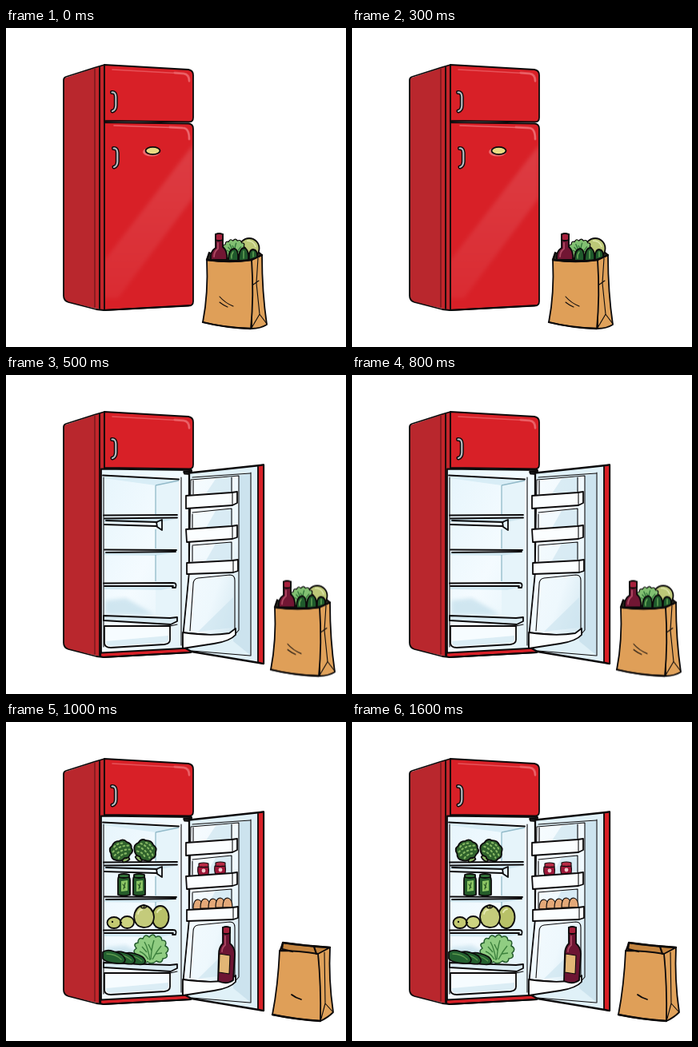
An HTML page for the animation above (2000 ms loop, 425 px wide and 399 px high).

```html
<!DOCTYPE html>
<html lang="en">
<head>
<meta charset="utf-8">
<title>Filling the fridge</title>
<style>
  html, body { margin: 0; width: 100%; height: 100%; overflow: hidden; background: #fff; }
  svg { display: block; width: 100vw; height: 100vh; }
  .ink { stroke: #0c0a0b; stroke-width: 1.8; stroke-linecap: round; stroke-linejoin: round; }
  .line { fill: none; }
  .thin { stroke-width: 1.1; }
  .bold { stroke-width: 2.3; }
  .shade { stroke: none; }
  .gloss { fill: none; stroke: #f0747a; stroke-width: 1.6; stroke-linecap: round; }

  .closed, .open, .stocked, .shopping { animation: 2s step-end infinite; }
  .closed { animation-name: closed; }
  .open { animation-name: open; }
  .stocked { animation-name: stocked; }
  .shopping { animation-name: shopping; }
  @keyframes closed { 0% { opacity: 1 } 25%, 100% { opacity: 0 } }
  @keyframes open { 0% { opacity: 0 } 25%, 100% { opacity: 1 } }
  @keyframes stocked { 0% { opacity: 0 } 50%, 100% { opacity: 1 } }
  @keyframes shopping {
    0% { opacity: 1; transform: translate(0, 0) }
    25% { opacity: 1; transform: translate(85px, .5px) }
    50%, 100% { opacity: 0; transform: translate(85px, .5px) }
  }
</style>
</head>
<body>
<svg viewBox="0 0 425 399" preserveAspectRatio="none">
  <defs>
    <linearGradient id="wall" x1="0" y1="0" x2="1" y2="1">
      <stop offset="0" stop-color="#e6f5fc"/><stop offset=".5" stop-color="#f4fbff"/><stop offset="1" stop-color="#e0f1f8"/>
    </linearGradient>
    <linearGradient id="inner" x1="0" y1="0" x2="1" y2="1">
      <stop offset="0" stop-color="#f7fcff"/><stop offset=".65" stop-color="#eef8fd"/><stop offset="1" stop-color="#cfe5ef"/>
    </linearGradient>
    <linearGradient id="sheen" x1="0" y1="0" x2="0" y2="1">
      <stop offset="0" stop-color="#fff" stop-opacity=".13"/><stop offset="1" stop-color="#fff" stop-opacity=".05"/>
    </linearGradient>
    <filter id="soft"><feGaussianBlur stdDeviation="2.5"/></filter>
    <clipPath id="door"><path d="M124 119 L233 121 V346 L124 351Z"/></clipPath>
    <g id="handle" fill="none" stroke-linecap="round" stroke-linejoin="round">
      <path id="grip" stroke="#0c0a0b" stroke-width="5" d="M132.500 80.500 Q137 80 137.300 86 V97 Q137 103 133 104"/>
      <path stroke="#b4bbc0" stroke-width="2.200" d="M132.500 80.500 Q137 80 137.300 86 V97 Q137 103 133 104"/>
    </g>
    <g id="broccoli" class="ink">
      <path fill="#8fb567" d="M-4 5 L-4 14 Q0 16 5 14 L5 5Z"/>
      <path fill="#2f622c" d="M-11 8 Q-16 4 -13 -2 Q-14 -9 -8 -10 Q-3 -15 3 -12 Q9 -13 11 -7 Q16 -3 13 2 Q14 8 8 9 Q4 13 0 10 Q-6 13 -11 8Z"/>
      <path class="line" style="stroke:#86b763;stroke-width:2.2;stroke-dasharray:1.5 3.5" d="M-6 -8 Q0 -11 7 -7 M-10 -3 Q0 -7 11 -2 M-10 2 Q0 -2 10 3 M-7 7 Q0 3 7 7"/>
    </g>
    <g id="jar" class="ink">
      <path fill="#255c2a" d="M2 3 Q1 5 1 8 V26 Q8 29 16 26 V8 Q16 5 14 3Z"/>
      <path fill="#34753a" d="M2 1 Q8 -1 15 1 V4 Q8 6 2 4Z"/>
      <path class="shade" fill="#8cc664" d="M5 9 L13 8 V21 L5 22Z"/>
      <path class="line thin" style="stroke:#245021" d="M7 13 L10 17 M10 11 L8 19"/>
    </g>
    <g id="jam" class="ink thin">
      <path fill="#9c1738" d="M0 5 Q-1 12 1 15 Q7 17 13 15 Q14 9 13 5Z"/>
      <path fill="#b72a45" d="M1 1 Q7 -1 13 1 V5 Q7 6 1 5Z"/>
      <circle class="shade" fill="#f1c6c9" cx="7" cy="10" r="2.4"/>
    </g>
    <path id="egg" class="ink thin" fill="#e3a878" d="M-6 7 Q-6 -5 0 -5 Q6 -4 6 7Z"/>
    <g id="cucumber" class="ink">
      <path fill="#236030" d="M-14 -6 Q-10 -10 0 -7 Q12 -4 14 3 Q14 9 5 8 Q-10 7 -14 2Z"/>
      <path class="line" style="stroke:#5d9b4e;stroke-width:1.5" d="M-9 -4 Q2 -4 9 3"/>
    </g>
    <path id="leaves" d="M-17 16 Q-22 11 -18 7 Q-24 3 -18 -1 Q-23 -7 -16 -8 Q-16 -15 -10 -13 Q-7 -20 -2 -15 Q3 -21 6 -15 Q13 -18 14 -11 Q21 -11 18 -4 Q25 0 19 5 Q23 11 15 12 Q14 19 7 15 Q1 20 -4 16 Q-11 20 -17 16Z"/>
    <path id="veins" d="M-1 14 Q-3 0 -8 -9 M0 13 Q1 -2 4 -11 M2 13 Q7 3 13 -4 M-3 13 Q-8 5 -14 3 M-5 4 L-11 -3 M1 2 L-3 -6 M6 6 L14 5"/>
  </defs>

  <!-- cabinet and freezer -->
  <path fill="#b9272d" d="M72 63 L111 50 L123 46 V353 L113 351 L78 343 Q72 341 72 335Z"/>
  <path fill="#d82128" d="M111 50 L124 46 V352 L111 350Z" opacity=".3"/>
  <path class="ink" fill="#d82027" d="M123 46 L228 52 Q234 53 234 59 V112 Q234 117.500 229 117.500 L123 116Z"/>
  <path class="gloss" d="M133 52 L222 57 Q229 58 229 67" opacity=".6"/>
  <path class="gloss" style="stroke-width:3;opacity:.55" d="M211 56 L222 57 Q229 58 229 66"/>
  <use href="#handle"/>

  <g class="closed">
    <path class="ink" fill="#d82027" d="M123 118 L228 119.500 Q234 120 234 126 V342 Q234 347.500 228 347.500 L123 353Z"/>
    <g clip-path="url(#door)">
      <path fill="url(#sheen)" filter="url(#soft)" d="M234 146 V212 L140 338 H122 V292Z"/>
    </g>
    <path class="gloss" d="M135 122 L221 125 Q229 125 229 139" opacity=".8"/>
    <path class="gloss" style="stroke-width:3;opacity:.55" d="M205 124 L221 125 Q229 125 229 139"/>
    <use href="#handle" x="2" y="70"/>
    <ellipse cx="182" cy="155" rx="11" ry="5.5" fill="#ef6a6e"/>
    <ellipse class="ink" cx="183.500" cy="153.500" rx="9" ry="4.700" fill="#eadb83"/>
  </g>

  <g class="open">
    <!-- compartment -->
    <path class="ink" fill="#d82027" d="M119 340 L231 338 V347 L122 353 L118 352Z"/>
    <path class="ink" fill="url(#wall)" d="M119 117.500 L232 119 L230 341.500 L119 347.500Z"/>
    <path fill="#d8edf6" d="M122 129 L187 138 L216 132 L122 127Z"/>
    <path fill="#e6f4fa" d="M187 138 L216 132 V303 L187 300Z"/>
    <path fill="#c5e1ed" d="M123 180 H213 L188 185 L123 184Z M123 222 H212 L187 226 L123 225Z M123 265 H211 L194 269 L123 268Z" opacity=".7"/>
    <path fill="#b9d9e7" filter="url(#soft)" d="M124 282 L150 279 L186 300 H124Z" opacity=".6"/>
    <path class="line" stroke="#92bac9" stroke-width="1.3" d="M187 138 V174 M187 193 V217 M187 225 V258 M187 138 L216 132"/>
    <path class="ink line" d="M121 125.500 L216 130.500"/>
    <path class="ink line thin" d="M219 128 V338 M122 128 V340"/>
    <path class="ink" fill="#27282b" d="M222 121 L231 121 V124 L223 123.500Z"/>
    <path class="ink line" d="M122 175.500 L214 175 M123 179.500 L214 178.500 M123 187 L188 189 M125 182 L189 184 M188 184 L195 181 V194 L189 190Z M123 218.500 L213 219 M125 222 L212 221 M122 260.500 L209 260 M123 264 L209 264 M209 260 Q214 260 212 266 L208 266"/>
    <path class="ink" fill="#d9ebf3" d="M122 301 L205 304 L214 303 V308 L206 312 L122 307Z"/>
    <path class="ink" fill="#f6fcff" d="M123 314 L205 314 V331 Q205 336 198 337 L131 341 Q123 341 123 335Z"/>
    <path class="shade" fill="#d0e7f1" d="M125 333 L203 326 V331 Q203 335 197 335 L131 339 Q125 339 125 334Z" opacity=".7"/>
    <path class="ink line thin" d="M205 314 L214 312"/>

    <!-- open door -->
    <path class="ink bold" fill="#e0f1f8" d="M229 122.500 L322 112.500 V361 L232 346 L221 340 L222 321 L229 249Z"/>
    <path fill="#cce3ee" d="M291 126 L305 123 V350 L284 333Z"/>
    <path fill="#deeff7" d="M307 122 L314 115 V358 L307 351Z"/>
    <path class="ink" fill="#d82027" d="M315 113.500 L322 112.500 V361 L315 359.500Z"/>
    <path class="ink thin" fill="url(#inner)" d="M231 131 L291 126 V319 L284 327 L222 322 L229 250Z"/>
    <path class="ink line thin" d="M306 122 V351 M233 128 L305 123 M232 345 L305 351"/>
    <path fill="#cae3ee" d="M262 130 L283 127 V147 L250 148Z M262 170 L283 167 V189 L250 191Z M262 211 L283 209 V231 L250 232Z M284 278 V316 L240 321Z" opacity=".6"/>
    <path class="ink line thin" d="M234 132 V149 M282 128 V146 M233 172 L282 167 V188 M233 174 V191 M233 213 L282 209 V231 M233 214 V233 M230 320 L234 262 Q234 255 240 254 L280 250 Q286 250 286 257 V317"/>
    <g class="stocked">
      <use href="#jam" x="240" y="176"/><use href="#jam" x="261" y="175"/>
      <use href="#egg" x="240" y="227"/><use href="#egg" x="249" y="226"/><use href="#egg" x="259" y="226"/><use href="#egg" x="268" y="225"/><use href="#egg" x="277" y="225"/>
    </g>
    <g class="ink" fill="#fbfeff">
      <path d="M225 151 L282 147 L289 146 V160 L283 163 L225 167Z"/>
      <path d="M225 193 L282 189 L289 188 V203 L283 205 L226 209Z"/>
      <path d="M226 235 L283 232 L290 231 V245 L284 247 L226 249Z"/>
      <path d="M221 322 Q255 327 279 323 L287 317 V325 Q280 333 260 336 L221 342Z"/>
    </g>
    <path class="ink line thin" d="M283 147 V162 M283 189 V204 M284 232 V246"/>
  </g>

  <!-- cabinet outline -->
  <path class="ink line" d="M123 46 L111 49.500 L75 61 Q72 62 72 65 V335 Q72 341 78 343 L113 352 L122 353 L231 347"/>
  <path class="line" stroke="#65151a" stroke-width="1.200" d="M111 51 V350"/>
  <path class="ink line" d="M117 49 V351 M123 47 V117"/>

  <g class="stocked">
    <use href="#broccoli" transform="translate(174 161) rotate(42)"/>
    <use href="#broccoli" transform="translate(144 161) rotate(-25)"/>
    <use href="#jar" x="139" y="190"/><use href="#jar" x="158" y="190"/>
    <g class="ink">
      <ellipse cx="193" cy="244" rx="10.500" ry="14" fill="#b8c168"/>
      <path fill="#c4cb7b" d="M160 244 Q161 231 172 229 Q184 231 185 244 Q184 257 172 257 Q161 256 160 244Z"/>
      <path class="line thin" d="M168 231 Q172 235 176 231 M172 233 L173 229"/>
      <ellipse cx="135" cy="251" rx="8.500" ry="7" fill="#c4ca72"/>
      <ellipse cx="151.500" cy="250.500" rx="8.500" ry="7.500" fill="#cdd480"/>
      <path class="line bold" d="M143 250 L144 251 M133 250 L133 250"/>
      <path class="line" style="stroke:#e6eab3" d="M165 240 Q166 235 170 235 M189 238 Q191 234 194 234"/>
    </g>
    <use href="#leaves" fill="#90cd82" stroke="#245c2d" stroke-width="1.500" x="181" y="284"/>
    <use href="#veins" fill="none" stroke="#3c813d" stroke-width="1.4" x="181" y="284"/>
    <use href="#cucumber" transform="translate(161 296) scale(.95 .9)"/>
    <use href="#cucumber" transform="translate(148 295) scale(.95 .95)"/>
    <use href="#cucumber" transform="translate(135 294)"/>

    <!-- wine -->
    <g class="ink">
      <path fill="#6c1533" d="M271 257 H280 V277 Q286 282 286 290 L284 323 Q276 329 265 324 L266 290 Q266 282 271 277Z"/>
      <path fill="#a4213c" d="M271 257 Q275 255 280 257 V264 Q275 266 271 264Z"/>
      <path class="thin" fill="#e2b675" d="M267 290 L280 292 L279 315 L266 313Z"/>
      <path class="line" style="stroke:#ac4964" d="M274 268 V279 Q270 282 270 287"/>
    </g>

    <!-- empty bag -->
    <g class="ink">
      <path fill="#c4843f" d="M346 276 Q374 280 405 282 L391 291 L342 287Z"/>
      <path fill="#e0a25b" d="M390 290 L405 282 Q403 322 409 363 Q402 370 393 374Z"/>
      <path fill="#df9f58" d="M342 286 Q366 286 390 290 Q394 330 393 374 Q362 372 333 366 Q340 330 342 286Z"/>
      <path class="line bold" d="M346 276 Q374 280 405 282 M346 276 L345 284 L358 287 M385 281 L388 290 M333 366 Q362 372 393 374"/>
      <path class="line thin" d="M398 288 L399 352 L394 371 M399 352 L408 362"/>
      <path class="line" d="M357 341 Q362 345 369 347"/>
    </g>
  </g>

  <!-- full bag -->
  <g class="shopping">
    <path class="ink" fill="#2b2a20" d="M251 290 L254 282 L272 277 L313 278 L320 284 L307 292Z"/>
    <circle class="ink" cx="304" cy="275.500" r="12.500" fill="#bdc878"/>
    <path class="line" stroke="#e0e7ad" stroke-width="1.5" d="M301 266 Q310 266 312 274"/>
    <g transform="translate(285 276) scale(.68 .66)">
      <use href="#leaves" class="ink" fill="#82c072"/>
      <use href="#veins" fill="none" stroke="#34783c" stroke-width="2"/>
    </g>
    <g class="ink">
      <path fill="#711633" d="M262 258 H271 V274 Q277 278 276 290 H256 Q255 279 262 275Z"/>
      <path fill="#a7203c" d="M262 258 Q266 256 271 258 V265 Q266 267 262 265Z"/>
      <path class="line" style="stroke:#b04a64" d="M265 269 V276 Q260 280 260 286"/>
      <path fill="#1f5a2c" d="M278 291 Q278 276 286 276 Q291 278 290 291Z M291 291 Q291 275 298 275 Q304 277 303 291Z M304 290 Q303 277 309 277 Q315 278 314 287Z"/>
      <path class="line" style="stroke:#6aa758;stroke-width:1.4" d="M284 280 Q281 284 282 288 M297 279 V288 M309 280 V286"/>
      <path fill="#e0a25b" d="M307 290 L320 284 Q320 330 326 371 Q318 376 307 376Z"/>
      <path fill="#df9f58" d="M251 290 Q280 294 307 290 Q310 335 306 376 Q274 375 246 368 Q253 332 251 290Z"/>
      <path class="line bold" d="M251 290 Q280 294 307 290 L320 284 M251 290 L254 281 M246 368 Q274 375 306 376"/>
      <path class="line thin" d="M315 288 L313 319 L317 358 L307 375 M317 358 L326 370 M309 321 L316 316 M267 336 Q274 344 284 348 M267 343 Q272 347 277 349"/>
    </g>
  </g>
</svg>
</body>
</html>
```
